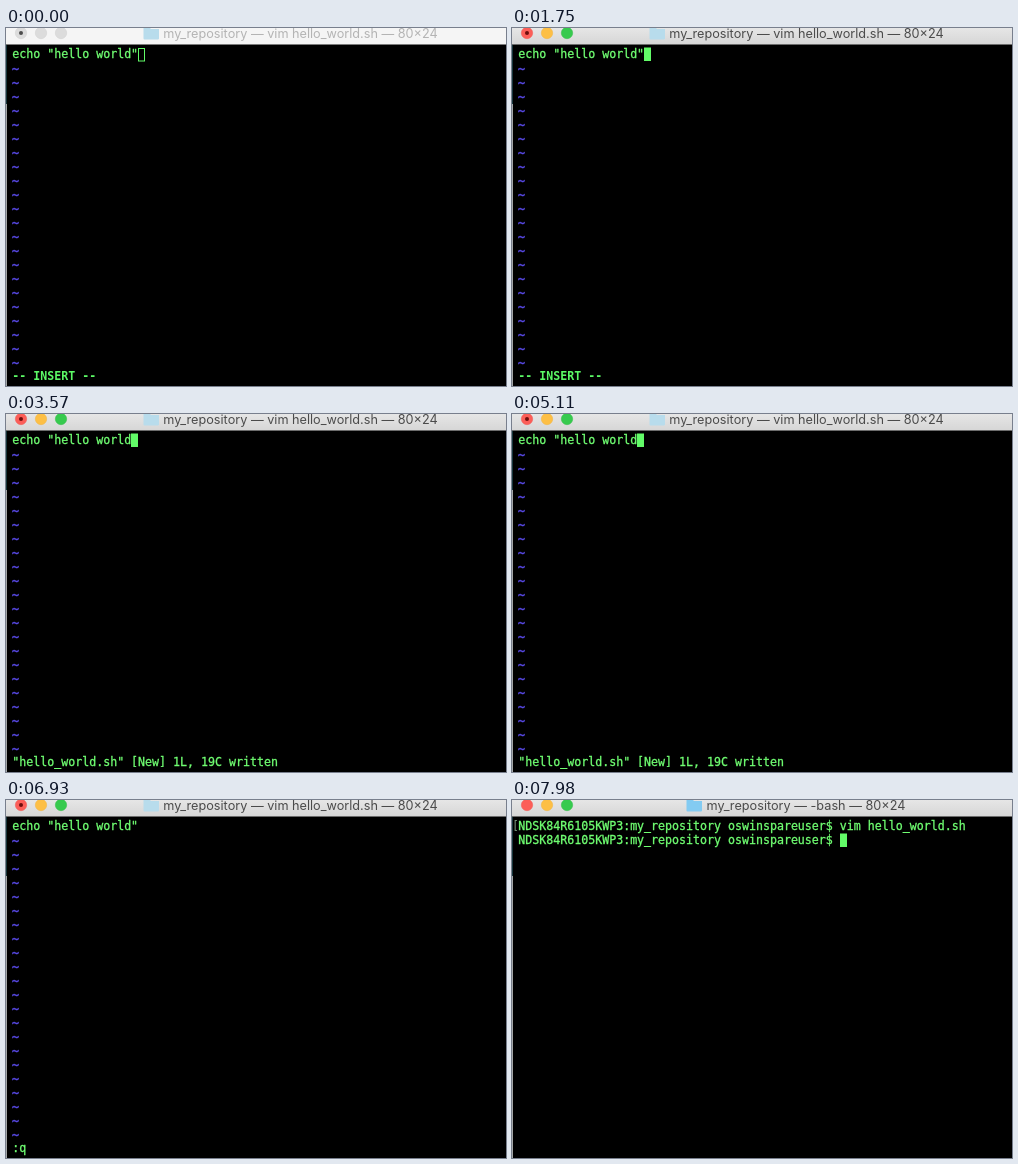
An HTML page that plays this animation: 500 by 358 pixels, repeating every 8000 ms.

```html
<!DOCTYPE html>
<html lang="en">
<head>
<meta charset="utf-8">
<title>Terminal</title>
<style>
  html, body { margin: 0; width: 100%; height: 100%; overflow: hidden; background: #000; }
  svg { display: block; width: 500px; height: 358px; }
  .term text {
    font: 11.627px "DejaVu Sans Mono", monospace; white-space: pre;
    fill: #70ff72; stroke: #70ff72; stroke-width: .3px;
  }
  .term .tilde { fill: #5a4bea; stroke: #5a4bea; stroke-width: .5px; }
  .term .bold { font-weight: bold; fill: #5cfa66; stroke: none; }
  .term .mark { fill: #7d9a80; stroke: none; }
  #title { font: 12.7px Inter, sans-serif; text-anchor: middle; fill: #4b4b4b; }
  .idle #title { fill: #b4b4b4; }
  .idle .light { fill: #dcdcdc; stroke: #cfcfcf; }
  .idle #bar { fill: #f5f5f5; }
  .idle #dot { fill: #4c4c4c; }
  #folder { fill: #b8dcec; }
  .shell #folder { fill: #83cbf2; }
  .shell #dot, .shell #tildes { display: none; }
  #cursor { fill: #62fb68; stroke: none; }
  .idle #cursor { fill: none; stroke: #62fb68; }
</style>
</head>
<body>
<svg id="stage" viewBox="0 0 500 358">
  <defs>
    <linearGradient id="chrome" x2="0" y2="1">
      <stop stop-color="#e6e6e6"/><stop offset="1" stop-color="#d6d6d6"/>
    </linearGradient>
  </defs>
  <rect width="500" height="358"/>
  <path d="M.5 17V76" stroke="#16363c"/>
  <path d="M.5 76V358" stroke="#a4a7a8"/>
  <rect id="bar" width="500" height="16.5" fill="url(#chrome)"/>
  <circle class="light" cx="15" cy="5" r="5.7" fill="#fc5e58" stroke="#ee5852" stroke-width=".5"/>
  <circle class="light" cx="35" cy="5" r="5.7" fill="#fdbf45" stroke="#f0b33e" stroke-width=".5"/>
  <circle class="light" cx="55" cy="5" r="5.7" fill="#37ca4e" stroke="#33bd47" stroke-width=".5"/>
  <circle id="dot" cx="15" cy="5" r="2" fill="#6e0d0c"/>
  <path id="folder" d="M0 0h6l1.5 1.5H15.5V11q0 1-1 1H1q-1 0-1-1z"/>
  <text id="title" y="10"></text>
  <g class="term">
    <g id="tildes"></g>
    <text id="mark" class="mark" x="0" y="30"></text>
    <text id="line0" x="6.3" y="30"></text>
    <text id="line1" x="6.3" y="44"></text>
    <text id="status" x="6.3" y="352"></text>
    <rect id="cursor"/>
  </g>
</svg>
<script>
const LOOP = 8000, CELL = 7, ROW = 14, LEFT = 6, TOP = 19;
const $ = id => document.getElementById(id);

const code = 'echo "hello world"';
const insert = '-- INSERT --';
const saved = '"hello_world.sh" [New] 1L, 19C written';
const prompt = 'NDSK84R6105KWP3:my_repository oswinspareuser$ ';

const END = [18, 0], QUOTE = [17, 0], CMD = [1, 23], CMD2 = [2, 23], SHELL = [46, 1];

// start ms, mode, status line, cursor [column, row] or null while blinked off
const steps = [
  [0, 'idle', insert, END],
  [560, 'edit', insert, END],
  [1050, 'edit', insert, null],
  [1610, 'edit', insert, END],
  [1960, 'edit', '', QUOTE],
  [2440, 'edit', ':', CMD],
  [2660, 'edit', ':', null],
  [3150, 'edit', ':w', CMD2],
  [3560, 'edit', saved, QUOTE],
  [3710, 'edit', saved, null],
  [4200, 'edit', saved, QUOTE],
  [4620, 'edit', saved, null],
  [5105, 'edit', saved, QUOTE],
  [5740, 'edit', saved, null],
  [5880, 'edit', ':', null],
  [6300, 'edit', ':', CMD],
  [6790, 'edit', ':q', null],
  [7210, 'shell', '', SHELL],
  [7420, 'shell', '', null],
  [7910, 'shell', '', SHELL]
];

for (let row = 1; row <= 22; row++) {
  const t = document.createElementNS('http://www.w3.org/2000/svg', 'text');
  t.setAttribute('class', 'tilde');
  t.setAttribute('x', LEFT);
  t.setAttribute('y', TOP + row * ROW + 12);
  t.textContent = '~';
  $('tildes').append(t);
}

function set(id, attrs) {
  for (const name in attrs) $(id).setAttribute(name, attrs[name]);
}

function show([, mode, status, cursor]) {
  const shell = mode === 'shell', idle = mode === 'idle';
  set('stage', { class: mode });
  $('title').textContent = `my_repository — ${shell ? '-bash' : 'vim hello_world.sh'} — 80×24`;
  set('title', { x: shell ? 294 : 294.5 });
  set('folder', { transform: `translate(${shell ? 174.5 : 137.5} -.5)` });
  $('mark').textContent = shell ? '[' : '';
  // the character under a block cursor is covered by it
  $('line0').textContent = shell ? prompt + 'vim hello_world.sh' : code;
  $('line1').textContent = shell ? prompt : '';
  $('status').textContent = status;
  set('status', { class: status === insert ? 'bold' : '' });
  set('cursor', { visibility: cursor ? 'visible' : 'hidden' });
  if (!cursor) return;
  const inset = idle ? 0.5 : 0;
  set('cursor', {
    x: LEFT + cursor[0] * CELL + inset,
    y: TOP + cursor[1] * ROW + inset + (idle ? 1 : 0.5),
    width: CELL - 2 * inset,
    height: ROW - 2 * inset - 0.5
  });
}

let current;
function tick() {
  const t = performance.now() % LOOP;
  const step = steps.findLast(s => s[0] <= t);
  if (step !== current) show(current = step);
  requestAnimationFrame(tick);
}
tick();
</script>
</body>
</html>
```
